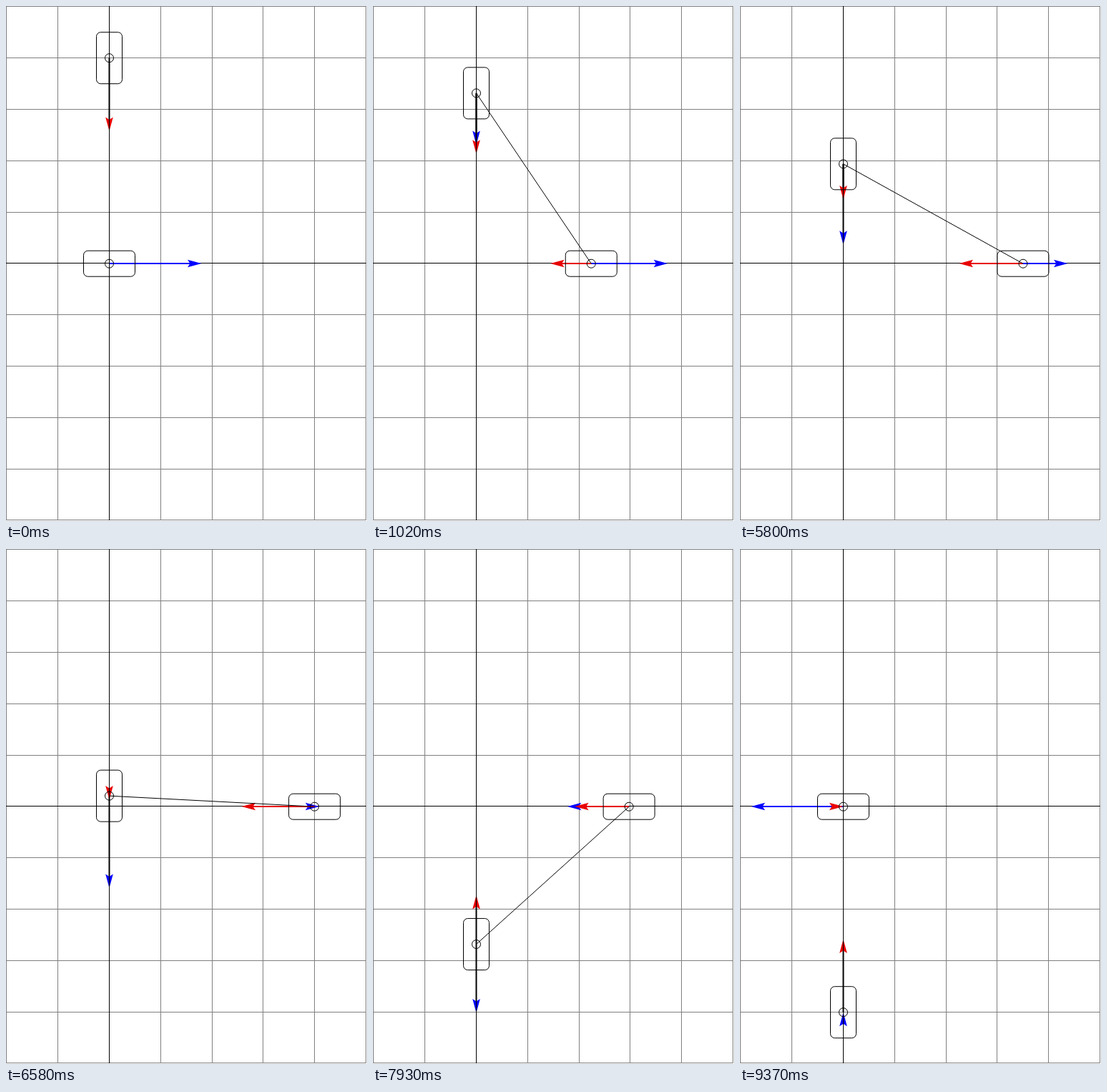
An HTML page with a canvas that plays this animation: 505 px wide and 720 px high, repeating every 9400 ms.

```html
<!DOCTYPE html>
<html lang="en">
<head>
<meta charset="utf-8">
<title>Sliding ladder</title>
<style>
  html, body { margin: 0; width: 100%; height: 100%; overflow: hidden; background: #fff; }
  canvas { display: block; }
</style>
</head>
<body>
<canvas id="stage" width="505" height="720"></canvas>
<script>
const ctx = document.getElementById('stage').getContext('2d');
const ORIGIN = { x: 144.5, y: 360.2 };
const LENGTH = 287.5;        // ladder, four grid cells
const VELOCITY = 129;        // longest velocity arrow
const ACCELERATION = 102.3;  // longest acceleration arrow
const STEP = 30, PAUSE_AT = 60, PAUSE = 4000, LOOP = 9400;
const BLUE = '#00f', RED = '#e80000';

// One degree per step, with a long hold at 60 degrees.
function degreesAt(ms) {
  const holdStart = PAUSE_AT * STEP;
  if (ms < holdStart) return Math.floor(ms / STEP);
  if (ms < holdStart + PAUSE) return PAUSE_AT;
  return Math.min(180, PAUSE_AT + 1 + Math.floor((ms - holdStart - PAUSE) / STEP));
}

function line(x1, y1, x2, y2, color = '#000', width = 1) {
  ctx.strokeStyle = color;
  ctx.lineWidth = width;
  ctx.beginPath();
  ctx.moveTo(x1, y1);
  ctx.lineTo(x2, y2);
  ctx.stroke();
}

const gridAt = k => Math.round(0.35 + 71.8 * k) + 0.5;

function drawGrid() {
  for (let k = 0; k <= 7; k++) line(gridAt(k), 0, gridAt(k), 719, '#808080');
  for (let k = 0; k <= 10; k++) line(0, gridAt(k), 504, gridAt(k), '#808080');
  line(0, gridAt(5), 504, gridAt(5));
}

// Arrow along one axis; the head keeps its size however short the arrow is.
function arrow(x, y, size, vertical, color) {
  if (size === 0) return;
  ctx.save();
  ctx.translate(x, y);
  if (vertical) ctx.rotate(Math.PI / 2);
  if (size < 0) ctx.scale(-1, 1);
  const tip = Math.abs(size);
  const shaft = vertical ? '#000' : color;
  if (tip > 16) line(0, 0, tip - 16, 0, shaft, 2);
  ctx.fillStyle = color;
  ctx.beginPath();
  ctx.moveTo(tip, 0);
  ctx.lineTo(tip - 19.5, 5.3);
  ctx.lineTo(tip - 16, 0);
  ctx.lineTo(tip - 19.5, -5.3);
  ctx.fill();
  ctx.restore();
}

function slider(x, y, w, h) {
  ctx.strokeStyle = '#000';
  ctx.lineWidth = 1;
  ctx.beginPath();
  ctx.roundRect(x - w / 2, y - h / 2, w, h, 6);
  ctx.stroke();
  ctx.beginPath();
  ctx.arc(x, y, 6, 0, 2 * Math.PI);
  ctx.stroke();
}

function draw(ms) {
  // The tiny excess settles which way zero-length arrows point.
  const angle = degreesAt(ms) * Math.PI / 180 * (1 + 1e-9);
  const sin = Math.sin(angle), cos = Math.cos(angle);
  const footX = ORIGIN.x + LENGTH * sin;
  const topY = ORIGIN.y - LENGTH * cos;

  ctx.fillStyle = '#fff';
  ctx.fillRect(0, 0, 505, 720);
  drawGrid();

  arrow(footX, 360, VELOCITY * cos, false, BLUE);
  arrow(footX, 360, -ACCELERATION * sin, false, RED);
  arrow(ORIGIN.x, topY, VELOCITY * sin, true, BLUE);
  arrow(ORIGIN.x, topY, ACCELERATION * cos, true, RED);
  line(gridAt(2), 0, gridAt(2), 719);

  slider(footX, ORIGIN.y, 72, 36);
  slider(ORIGIN.x, topY, 36, 72);
  line(ORIGIN.x, topY, footX, ORIGIN.y);
}

function tick() {
  draw(performance.now() % LOOP);
  requestAnimationFrame(tick);
}
tick();
</script>
</body>
</html>
```
